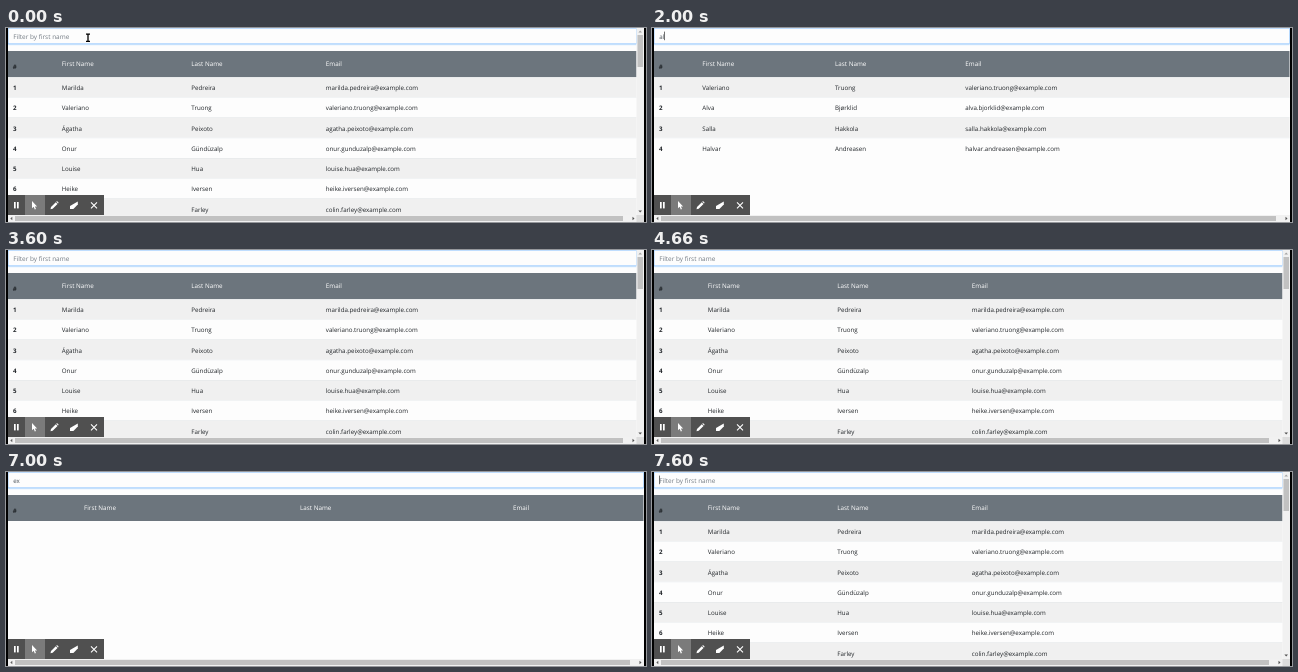
Animation, 640 px wide and 194 px high, one loop 8 s. Source, as an HTML page:

```html
<!DOCTYPE html>
<html lang="en">
<head>
<meta charset="utf-8">
<title>Table filter</title>
<style>
  html, body { margin: 0; width: 100%; height: 100%; overflow: hidden; background: #000; }
  svg { display: block; width: 640px; height: 194px; }
  text { font: 6.2px "Open Sans", "Noto Sans", sans-serif; fill: #212529; text-rendering: geometricPrecision; white-space: pre; }
  .head { fill: #fff; font-size: 6.3px; }
  .bold { font-weight: 700; }
  .typed { fill: #495057; }
  .hint { fill: #757d85; font-size: 6.45px; }
</style>
</head>
<body>
<svg id="stage" viewBox="0 0 640 194"></svg>
<script>
const LOOP = 8000;
const ROW = 20.25;
const stage = document.getElementById('stage');

const people = [
  'Marilda Pedreira', 'Valeriano Truong', 'Ágatha Peixoto', 'Onur Gündüzalp',
  'Louise Hua', 'Heike Iversen', 'Colin Farley', 'Ramona Ibsen', 'Marten Visser',
  'Sabine Rothe', 'Rebeka Novotna', 'Petra Lindahl', 'Alva Bjørklid',
  'Salla Hakkola', 'Halvar Andreasen'
].map(name => name.split(' '));

// Time in ms, typed text, caret visible
const timeline = [
  [0, '', 0], [260, '', 1], [800, 'a', 1], [930, 'al', 1], [1460, 'al', 0],
  [2000, 'al', 1], [2130, 'a', 1], [2400, '', 1], [2530, '', 0], [3060, '', 1],
  [3600, '', 0], [4130, '', 1], [4660, '', 0], [4800, 'e', 1], [5060, 'ex', 1],
  [5260, 'exa', 1], [5400, 'exam', 1], [5930, 'exam', 0], [6460, 'exam', 1],
  [6660, 'exa', 1], [6860, 'ex', 1], [7000, 'ex', 0], [7260, 'e', 1], [7530, '', 1]
];

const rect = (x, y, w, h, fill) =>
  `<rect x="${x}" y="${y}" width="${w}" height="${h}" fill="${fill}"/>`;
const path = (d, fill, more = '') => `<path d="${d}" fill="${fill}" ${more}/>`;
const text = (x, y, value, style = '') =>
  `<text x="${x}" y="${y}" class="${style}">${value}</text>`;

const email = (first, last) =>
  `${first}.${last}@example.com`.toLowerCase().replace(/ø/g, 'o')
    .normalize('NFD').replace(/[\u0300-\u036f]/g, '');

function table(rows, right) {
  const columns = !rows.length ? [78, 294, 507] : rows.length < 5 ? [50.3, 183, 313.3] : [55.8, 185.3, 319.8];
  let out = rect(2, 23, right - 2, 26, '#6c757d') + text(6.8, 41.4, '#', 'bold');
  ['First Name', 'Last Name', 'Email'].forEach((label, i) => {
    out += text(columns[i], 38.2, label, 'head');
  });
  rows.slice(0, 7).forEach(([first, last], i) => {
    const y = 49 + i * ROW;
    out += rect(2, y, right - 2, ROW, i % 2 ? '#fdfdfd' : '#f0f0f0');
    out += rect(2, y, right - 2, 0.4, '#dee2e6');
    out += text(7, y + 13.2, i + 1, 'bold');
    [first, last, email(first, last)].forEach((value, c) => {
      out += text(columns[c], y + 13.2, value);
    });
  });
  return out;
}

function input(value, right) {
  const glow = rect(2, 0, right - 2, 17.2, '#c4e0fc');
  const border = rect(2, 0, right - 2, 16, '#80bdff');
  const field = rect(2.4, 0.5, right - 2.8, 15, '#fdfdfd');
  return glow + border + field +
    (value ? text(7.2, 10.6, value, 'typed') : text(7.2, 10.6, 'Filter by first name', 'hint'));
}

function scrollbars(scrolls, count) {
  const right = scrolls ? 630.5 : 637.5;
  const arrow = right - 4;
  let out = rect(2, 187, 636, 7, '#f1f1f1') +
    rect(9, 188, right - 22.5, 5, '#c1c1c1') +
    path('M6.3 188.8V192.2L4.3 190.5Z', '#606060') +
    path(`M${arrow} 188.8V192.2L${arrow + 2} 190.5Z`, '#505050');
  if (scrolls) {
    out += rect(630.5, 0, 7.5, 187, '#f1f1f1') +
      rect(631.5, 7, 5.5, count === people.length ? 32 : 75, '#c1c1c1') +
      path('M632.4 4.4H636L634.2 2.4Z', '#a3a3a3') +
      path('M632.4 182.4H636L634.2 184.4Z', '#505050') +
      rect(630.5, 187, 7.5, 7, '#dcdcdc');
  }
  return out;
}

const toolbar = rect(2, 167, 96, 20, '#505050') + rect(19, 167, 20, 20, '#7b7b7b') +
  rect(8, 174, 1.7, 6.4, '#fff') + rect(11, 174, 1.7, 6.4, '#fff') +
  path('M26 173V180.3L27.7 178.8L28.8 181.5L30 181L28.9 178.4H31.1Z', '#fff') +
  path('M44.5 181.2L45 179L49.8 174.2L51.5 175.9L46.7 180.7ZM50.3 173.7L51 173L52.7 174.7L52 175.4Z', '#fff') +
  path('M64 178L71.8 173.5V176.6L67.4 181H64Z', '#fff') +
  path('M85 174.3L91 180.3M91 174.3L85 180.3', 'none', 'stroke="#fff" stroke-width="1.1"');

const pointer = x => path(
  `M${x - 2} 6.2H${x + 2}M${x} 6V13.6M${x - 2} 13.4H${x + 2}`,
  'none', 'stroke="#000" stroke-width="1.3"');

function draw(value, caret, pointerX) {
  const rows = people.filter(([first]) => first.toLowerCase().includes(value));
  const scrolls = rows.length > 6;
  const right = scrolls ? 630.5 : 637.5;
  stage.innerHTML = rect(2, 0, 636, 194, '#fdfdfd') + input(value, right) +
    table(rows, right) + scrollbars(scrolls, rows.length) + toolbar +
    (pointerX ? pointer(pointerX) : '');
  if (caret) {
    const width = value ? stage.querySelector('.typed').getComputedTextLength() : 0;
    stage.insertAdjacentHTML('beforeend', rect(7.2 + width, 3.6, 0.7, 8.6, '#333'));
  }
}

let shown;
function tick() {
  const time = performance.now() % LOOP;
  const [, value, caret] = timeline.findLast(([start]) => start <= time);
  const pointerX = time < 60 ? 82 : time < 130 ? 629 : 0;
  const key = [value, caret, pointerX].join();
  if (key !== shown) draw(value, caret, pointerX);
  shown = key;
  requestAnimationFrame(tick);
}
tick();
</script>
</body>
</html>
```
